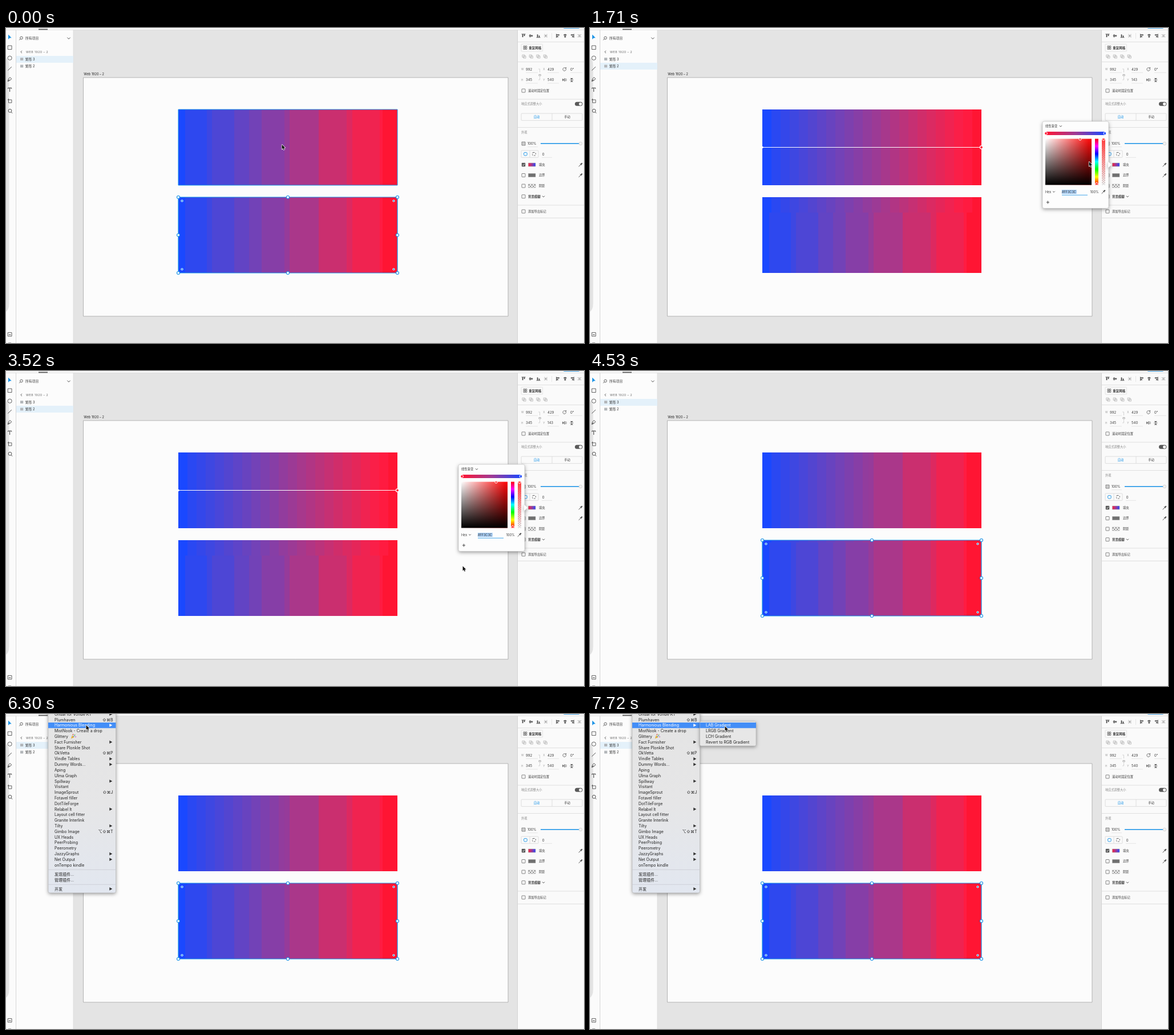
An HTML page with a canvas that plays this animation: 1013 by 553 pixels, repeating every 8 s.

```html
<!DOCTYPE html>
<html lang="zh">
<head>
<meta charset="utf-8">
<title>Colour ramp editor</title>
<style>
html, body { margin: 0; width: 100%; height: 100%; background: #e4e4e4; }
canvas { position: fixed; left: 0; top: 0; }
</style>
</head>
<body>
<canvas id="stage" width="1013" height="553"></canvas>
<script>
const ctx = document.getElementById('stage').getContext('2d');
const LOOP = 8000, BLUE = '#1490e6', INK = '#3c3c3c';
const FONT = 'Inter, "Noto Sans CJK SC", "Noto Sans CJK", "DejaVu Sans", sans-serif';
const BOX = { x: 302, w: 384, h: 133, top: 143, bottom: 297 };

// Pointer positions: start time, x, y
const POINTER = [
  [0, 483, 204], [360, 690, 230], [690, 950, 260], [870, 926, 246], [1140, 920, 240],
  [1710, 874, 234], [1890, 872, 240], [2070, 868, 246], [2250, 867, 260], [2440, 867, 282],
  [2620, 870, 309], [2800, 886, 332], [2980, 915, 343], [3160, 930, 343], [3340, 800, 342],
  [3550, 560, 325], [3730, 474, 289], [3910, 350, 200], [4130, 255, 130], [4350, 144, 8],
  [4530, 140, -30], [5420, 134, 8], [5600, 135, 15], [5780, 136, 16], [5960, 137, 18],
  [6130, 139, 19], [6300, 140, 19], [6480, 142, 20], [6660, 160, 20], [6840, 185, 21],
  [7000, 205, 22], [7180, 225, 26], [7360, 234, 27], [7540, 236, 23], [7720, 236, 21]
];

// Label, then "▸" for a submenu or a shortcut
const MENU = [
  ['Ondal for Vonde KT', '▸'], ['Plumhaven', '⇧⌘B'], ['Harmonious Blending', '▸'],
  ['MistNook - Create a drop'], ['Glittery'], ['Fact Furnisher', '▸'], ['Share Plonkle Shot'],
  ['OkVetta', '⇧⌘P'], ['Vindle Tables', '▸'], ['Dummy Words...', '▸'], ['Aping'],
  ['Ulma Graph'], ['Spillway', '▸'], ['Visitant'], ['ImageSprout', '⇧⌘J'],
  ['Fotavel filler'], ['DotTileForge'], ['Relabel It', '▸'], ['Layout cell fitter'],
  ['Granite Interlink'], ['Tilty', '▸'], ['Gimbo Image', '⌥⇧⌘T'], ['UX Heads'],
  ['PeerProbing'], ['Peerometry'], ['JazzyGraphs', '▸'], ['Net Output', '▸'], ['onTempo kindle']
];
const SUBMENU = ['LAB Gradient', 'LRGB Gradient', 'LCH Gradient', 'Revert to RGB Gradient'];

function fill(color, x, y, w, h, r = 0) {
  ctx.fillStyle = color;
  ctx.beginPath();
  ctx.roundRect(x, y, w, h, r);
  ctx.fill();
}
function frame(color, x, y, w, h, r = 0, width = 0.8) {
  ctx.strokeStyle = color;
  ctx.lineWidth = width;
  ctx.beginPath();
  ctx.roundRect(x, y, w, h, r);
  ctx.stroke();
}
function trace(points) {
  ctx.beginPath();
  for (let i = 0; i < points.length; i += 2) ctx.lineTo(points[i], points[i + 1]);
}
function line(color, width, ...points) {
  ctx.strokeStyle = color;
  ctx.lineWidth = width;
  trace(points);
  ctx.stroke();
}
function shape(color, ...points) {
  ctx.fillStyle = color;
  trace(points);
  ctx.fill();
}
function circle(x, y, r, color, stroke, width = 1) {
  ctx.beginPath();
  ctx.arc(x, y, r, 0, 7);
  if (color) { ctx.fillStyle = color; ctx.fill(); }
  if (stroke) { ctx.strokeStyle = stroke; ctx.lineWidth = width; ctx.stroke(); }
}
function text(str, x, y, { size = 5.5, color = INK, weight = 400, align = 'left', spacing = 0 } = {}) {
  ctx.font = `${weight} ${size}px ${FONT}`;
  ctx.letterSpacing = spacing + 'px';
  ctx.textAlign = align;
  ctx.fillStyle = color;
  ctx.fillText(str, x, y + size * 0.37);
}
function blend(x0, y0, x1, y1, ...colors) {
  const g = ctx.createLinearGradient(x0, y0, x1, y1);
  colors.forEach((c, i) => g.addColorStop(i / (colors.length - 1), c));
  return g;
}
function checker(x, y, w, h, s, color = '#999') {
  fill('#fff', x, y, w, h);
  for (let j = 0; j * s < h; j++)
    for (let i = j % 2; i * s < w; i += 2)
      fill(color, x + i * s, y + j * s, Math.min(s, w - i * s), Math.min(s, h - j * s));
}
function chevron(x, y, color = INK, s = 2.2) {
  line(color, 0.9, x - s, y - s / 2, x, y + s / 2, x + s, y - s / 2);
}
function shadowed(blur, alpha, draw) {
  ctx.save();
  ctx.shadowColor = `rgba(0,0,0,${alpha})`;
  ctx.shadowBlur = blur;
  ctx.shadowOffsetY = 2;
  draw();
  ctx.restore();
}
function clipped(x, y, w, h, draw) {
  ctx.save();
  ctx.beginPath();
  ctx.rect(x, y, w, h);
  ctx.clip();
  draw();
  ctx.restore();
}

// Banded blue-to-red ramp
const COARSE = [302, 314, 352, 361, 400, 426, 448, 488, 497, 548, 597, 607, 655, 660, 686];
const FINE = Array.from({ length: 25 }, (_, i) => BOX.x + i * 16);
function ramp(y, edges) {
  for (let i = 0; i < edges.length - 1; i++) {
    const first = i === 0, last = i === edges.length - 2;
    const u = first ? 0 : last ? 1 : ((edges[i] + edges[i + 1]) / 2 - BOX.x) / BOX.w;
    const rgb = [Math.min(255, 26 + 250 * u), 72 - 51 * u * u, 255 - 204 * u].map(Math.round);
    fill(`rgb(${rgb})`, edges[i], y, edges[i + 1] - edges[i], BOX.h);
  }
}
function ramps(edges) {
  ramp(BOX.top, edges);
  ramp(BOX.bottom, edges);
}
function selection(y) {
  const { x, w, h } = BOX;
  frame(BLUE, x, y, w, h, 0, 1.2);
  for (const i of [0, 1, 2]) for (const j of [0, 1, 2])
    if (i !== 1 || j !== 1) circle(x + i * w / 2, y + j * h / 2, 2.5, '#fff', BLUE, 1.1);
  for (const px of [x + 6.5, x + w - 6.5])
    for (const py of [y + 6.5, y + h - 6.5]) {
      circle(px, py, 2.1, '#fff');
      circle(px, py, 1.2, BLUE);
    }
}

function toolbar() {
  fill('#fbfbfb', 0, 0, 18, 553);
  ctx.fillStyle = '#e3e3e3';
  ctx.beginPath();
  ctx.moveTo(0, 52);
  ctx.quadraticCurveTo(5.5, 56, 5.5, 66);
  ctx.lineTo(5.5, 484);
  ctx.quadraticCurveTo(5.5, 494, 0, 498);
  ctx.fill();
  line('#d6d6d6', 1, 17.5, 3, 17.5, 553);
  shape(BLUE, 4, 11.5, 4, 20, 6.3, 17.6, 9.6, 17.2);
  frame(INK, 3.2, 31, 6.8, 6.6);
  circle(6.6, 52.7, 3.6, null, INK, 0.8);
  line(INK, 0.9, 3.3, 74.5, 9.8, 68);
  line(INK, 0.9, 3.3, 93.5, 4.4, 89.3, 7, 86.5, 9.7, 89.2, 7, 92, 3.3, 93.5, 6.3, 90.3);
  line(INK, 1, 3.5, 106.7, 3.5, 105.2, 9.7, 105.2, 9.7, 106.7);
  line(INK, 1, 6.6, 105.2, 6.6, 112);
  frame(INK, 4.5, 126, 5.4, 5.2);
  line(INK, 0.8, 2.7, 126, 4.5, 126, 4.5, 124);
  circle(7, 145.3, 2.9, null, INK, 0.9);
  line(INK, 1, 9, 147.5, 11, 149.6);
  frame(INK, 3.2, 534.7, 6.8, 6.4);
  line(INK, 0.9, 4.8, 538.5, 8.4, 538.5);
  line('#aaa', 1, 4, 552.5, 9, 552.5);
}

function layers(selected) {
  fill('#fcfcfc', 18, 0, 100, 553);
  line('#d8d8d8', 0.7, 118, 3, 118, 553);
  circle(27, 17.4, 2.3, null, INK, 0.8);
  line(INK, 0.9, 25.2, 19.2, 23.2, 21.2);
  text('所有项目', 34, 18, { size: 5.8 });
  chevron(110, 18, INK, 2.6);
  line(INK, 0.8, 28, 39.8, 25.8, 42, 28, 44.2);
  text('WEB 1920 – 2', 35, 42, { size: 5.1, color: '#777', weight: 500, spacing: 0.5 });
  fill('#e4f1fa', 18, selected === 3 ? 49 : 61, 100, 12);
  [['矩形 3', 54.6], ['矩形 2', 67]].forEach(([name, y]) => {
    fill('#b8bcc0', 25, y - 2.5, 5.2, 5);
    line('#999', 0.5, 25, y, 30.2, y);
    text(name, 34, y, { size: 5.7, color: '#222' });
  });
}

function checkbox(y, on) {
  if (on) fill('#555', 903.8, y - 3.2, 6.4, 6.4, 0.8);
  else frame('#666', 904, y - 3, 6, 6, 0.6);
  if (on) line('#fff', 0.9, 905.3, y, 906.6, y + 1.4, 908.8, y - 1.4);
}
function eyedropper(x, y) {
  line('#555', 1, x - 3.3, y + 3.3, x + 1, y - 1);
  line('#444', 2, x + 0.6, y - 0.6, x + 2.8, y - 2.8);
  line('#444', 0.9, x - 1, y - 1.8, x + 1.8, y + 1);
}
function alignIcon(x, vertical, edge, color = '#444') {
  ctx.save();
  ctx.translate(x, 13.7);
  if (vertical) ctx.rotate(-Math.PI / 2);
  line(color, 0.8, edge * 3, -3.5, edge * 3, 3.5);
  fill(color, edge < 0 ? -2.6 : edge > 0 ? -2.4 : -2.5, -2.3, 5, 1.7);
  fill(color, edge < 0 ? -2.6 : edge > 0 ? -0.4 : -1.5, 0.7, 3, 1.7);
  ctx.restore();
}

function inspector(selected) {
  fill('#fafafa', 896, 0, 117, 553);
  line('#d4d4d4', 1, 896.5, 3, 896.5, 553);
  for (const y of [24.5, 59.5, 125, 174.5, 311, 333.5]) line('#d9d9d9', 0.8, 897, y, 1013, y);

  [1, 0, -1].forEach((edge, i) => alignIcon(907 + i * 13, true, edge));
  [-1, 0, 1].forEach((edge, i) => alignIcon(967.5 + i * 12.4, false, edge));
  for (const dx of [-2, 2]) line('#aaa', 0.7, 946 + dx, 10.5, 946 + dx, 17);
  for (const dy of [-2, 2]) line('#aaa', 0.7, 1001.5, 13.7 + dy, 1008.5, 13.7 + dy);
  fill('#aaa', 945, 12, 2, 3.5);
  fill('#aaa', 1003.3, 12.7, 3.5, 2);
  line('#ddd', 0.7, 956.5, 9, 956.5, 19);

  frame('#ddd', 903, 28.3, 37.5, 12.8, 1);
  for (const x of [907, 910.4]) for (const y of [31.5, 34.9]) frame('#444', x, y, 2.4, 2.6, 0, 0.7);
  text('重复网格', 916.2, 34.8, { weight: 600 });
  for (const x of [904.8, 917.2, 929.8, 942.2]) {
    frame('#aaa', x, 47.2, 4.2, 4, 0, 0.7);
    frame('#aaa', x + 2, 49, 4.2, 4, 0, 0.7);
  }

  const rows = [['W', '992', 'X', '429', 72.3], ['H', '345', 'Y', selected === 3 ? '540' : '143', 91]];
  for (const [a, av, b, bv, y] of rows) {
    text(a, 903, y, { size: 4.6, color: '#999' });
    text(av, 911, y, { size: 6 });
    text(b, 941.3, y, { size: 4.6, color: '#999' });
    text(bv, 949, y, { size: 6 });
    line('#ddd', 0.7, 911, y + 6, 932, y + 6);
    line('#ddd', 0.7, 949, y + 6, 969, y + 6);
  }
  text('0°', 989, 72.3, { size: 6 });
  line('#ddd', 0.7, 989, 78.3, 1010, 78.3);
  line('#bbb', 0.6, 933, 72, 935.5, 72, 935.5, 78);
  line('#bbb', 0.6, 933, 91, 935.5, 91, 935.5, 86);
  frame('#777', 934, 81.5, 3.2, 2.6, 0.3, 0.6);
  ctx.beginPath();
  ctx.arc(978.7, 72.5, 2.8, -0.4, 5.2);
  ctx.strokeStyle = '#555';
  ctx.lineWidth = 0.8;
  ctx.stroke();
  shape('#555', 979.5, 71, 982, 71, 982, 68.6);
  shape('#555', 975.3, 88.5, 975.3, 93.5, 978, 91);
  line('#555', 0.8, 978.8, 88, 978.8, 94);
  frame('#555', 979.7, 89.4, 2.4, 3.2, 0, 0.6);
  shape('#555', 988.8, 88, 994, 88, 991.4, 90.5);
  shape('#555', 988.8, 94.6, 994, 94.6, 991.4, 92);
  line('#555', 0.8, 988.3, 91.2, 994.5, 91.2);

  checkbox(110);
  text('滚动时固定位置', 915, 110, { size: 5.3, weight: 500 });
  text('响应式调整大小', 903, 133.5, { size: 5.2, color: '#888' });
  fill('#5a5a5a', 997, 129.8, 13.5, 7, 3.5);
  circle(1006.8, 133.3, 2.6, '#fff');
  frame('#d6d6d6', 903, 150, 107, 12.3, 1);
  line('#d6d6d6', 0.8, 957, 150, 957, 162);
  text('自动', 930, 156, { size: 5.3, color: BLUE, weight: 500, align: 'center' });
  text('手动', 983.5, 156, { size: 5.3, weight: 500, align: 'center' });

  text('外观', 903, 183.5, { size: 5.2, color: '#888' });
  checker(904, 200, 6, 6, 1.5);
  frame('#666', 904, 200, 6, 6, 0, 0.7);
  text('100%', 914, 202.7, { size: 5.8 });
  line('#ddd', 0.7, 914, 208.7, 932, 208.7);
  line(BLUE, 1.6, 937, 202.8, 1006, 202.8);
  circle(1007, 202.8, 2.8, '#f2f2f2', '#ccc', 0.7);
  frame('#d6d6d6', 903, 215, 30, 12.3, 1);
  line('#d6d6d6', 0.8, 918, 215, 918, 227);
  frame(BLUE, 907.6, 218.5, 5.6, 5.4, 1.5, 0.9);
  ctx.setLineDash([2.6, 1.7]);
  frame('#555', 922.7, 218.5, 5.6, 5.4, 1.3, 0.9);
  ctx.setLineDash([]);
  text('0', 939.8, 221.3, { size: 6 });
  line('#ddd', 0.7, 939, 227.3, 957, 227.3);

  [['填充', 240], ['边界', 258.5], ['阴影', 277.2]].forEach(([label, y], i) => {
    checkbox(y, i === 0);
    if (i === 2) checker(915.5, y - 3, 12.5, 6, 2.5);
    else fill(i ? '#707070' : blend(915, 0, 928, 0, '#ff2038', '#a03a94', '#2848ff'), 915.5, y - 3, 12.5, 6);
    frame('#999', 915.5, y - 3, 12.5, 6, 0, 0.5);
    text(label, 934, y, { size: 5.3, weight: 500 });
    if (i < 2) eyedropper(1007, y);
  });
  checkbox(295.8);
  text('背景模糊', 915, 295.8, { size: 5.4, weight: 600 });
  chevron(942, 295.8, INK, 2);
  checkbox(322);
  text('添加导出标记', 915, 322, { size: 5.3, weight: 500 });
}

function colorPopup() {
  shadowed(6, 0.4, () => {
    fill('#fdfdfd', 793, 164, 116, 152.5, 3);
    shape('#fdfdfd', 908, 234, 914, 240, 908, 246);
  });
  frame('#c4c4c4', 793, 164, 116, 152.5, 3, 0.6);
  shape('#fdfdfd', 908, 235, 913.5, 240, 908, 245);
  text('线性渐变', 798, 172.3, { size: 5.3 });
  chevron(824.8, 172.3, INK, 2);
  fill(blend(799, 0, 903, 0, '#ff1533', '#a03a94', '#1a48ff'), 798.5, 182, 104.5, 6);
  clipped(797, 180, 107, 10, () => {
    circle(799, 185, 2.4, '#ff1533', '#fff', 1);
    circle(902.5, 185, 2.4, '#1a48ff', '#fff', 1);
  });
  fill(blend(798, 0, 879, 0, '#fff', '#f00'), 798, 194.5, 81, 81);
  fill(blend(0, 194, 0, 275, 'rgba(0,0,0,0)', '#000'), 798, 194.5, 81, 81);
  fill(blend(0, 194, 0, 275, '#f00', '#f0f', '#00f', '#0ff', '#0f0', '#ff0', '#f00'), 885, 194.5, 6, 81);
  checker(897, 194.5, 6, 81, 2, '#ccc');
  fill(blend(0, 194, 0, 275, '#ff3c3c', 'rgba(255,60,60,0)'), 897, 194.5, 6, 81);
  clipped(797, 194, 108, 82, () => {
    for (const [x, y] of [[859, 194.7], [888, 273.8], [900, 195]]) circle(x, y, 2.3, '#f33', '#fff', 1);
  });
  text('Hex', 798, 287.5, { size: 5.5 });
  chevron(813, 287.5, INK, 1.8);
  fill('#a6cdf5', 826.8, 284, 26, 7.2);
  text('#FF3C3C', 827, 287.5, { size: 5.5 });
  line(BLUE, 0.8, 827, 293.3, 872, 293.3);
  text('100%', 876.5, 287.5, { size: 5.7 });
  eyedropper(900, 287.5);
  line(INK, 0.9, 799.8, 306, 805, 306);
  line(INK, 0.9, 802.4, 303.4, 802.4, 308.6);
}

function arrow(y, color) {
  shape(color, 181.3, y - 2.7, 181.3, y + 2.7, 186.3, y);
}
function menuText(label, x, y, active, align) {
  text(label, x, y, { size: 7, color: active ? '#fff' : '#222', align });
}
function menu(active) {
  const paper = blend(0, 0, 0, 314, '#e4e4e4', '#e6e6e7', '#e2e7f0');
  shadowed(6, 0.4, () => fill(paper, 74, -10, 118.5, 324, 3));
  frame('#b8b8b8', 74, -10, 118.5, 324, 3, 0.6);
  MENU.forEach(([label, extra], i) => {
    const y = 0.2 + i * 9.81, on = i === active;
    if (on) fill('#438ef7', 74, y - 4.9, 118.5, 9.8);
    menuText(label, 85, y, on);
    if (extra === '▸') arrow(y, on ? '#fff' : '#333');
    else if (extra) menuText(extra, 187.5, y, on, 'right');
  });
  shape('#e0b040', 113.8, 43.2, 116, 37.3, 119.6, 41);
  ['#d8433c', '#4a90d9', '#58a848', '#c05ac0'].forEach((c, i) =>
    circle(117.5 + i * 1.5, 36 + (i * 3) % 5, 0.9, c));
  for (const y of [273.3, 299.3]) line('#c9ccd3', 0.8, 74, y, 192.5, y);
  menuText('发现插件...', 85, 281.2);
  menuText('管理插件...', 85, 291);
  menuText('开发', 85, 307);
  arrow(307, '#333');
}
function submenu(active) {
  shadowed(6, 0.4, () => fill('#e7e7e7', 192.5, 13, 98.5, 43, 2.5));
  frame('#b8b8b8', 192.5, 13, 98.5, 43, 2.5, 0.6);
  SUBMENU.forEach((label, i) => {
    const y = 19.9 + i * 9.81;
    if (i === active) fill('#438ef7', 192.5, y - 4.9, 98.5, 9.8);
    menuText(label, 203, y, i === active);
  });
}

function pointer(t) {
  const [, x, y] = POINTER.findLast(p => p[0] <= t);
  ctx.save();
  ctx.translate(x, y);
  ctx.lineJoin = 'round';
  const outline = [0.5, 0.5, 0.5, 8.8, 2.4, 7.1, 3.6, 9.9, 5, 9.3, 3.8, 6.5, 6.4, 6.4, 0.5, 0.5];
  line('#fff', 1.4, ...outline);
  shape('#111', ...outline);
  ctx.restore();
}

function draw(t) {
  const selected = t < 690 || t >= 3550 ? 3 : 2;
  const popup = t >= 1710 && t < 3550;

  fill('#e4e4e4', 0, 0, 1013, 553);
  fill('#fcfcfc', 135.5, 87, 744.5, 419);
  frame('#a4a4a4', 135.5, 87, 744.5, 419, 0, 0.8);
  text('Web 1920 – 2', 136.3, 80.7, { size: 5.6, color: '#222' });

  ramps(COARSE);
  const fineArea = popup ? [302, 143, 384, 181] : t >= 3910 ? [302, 143, 186, 158] : null;
  if (fineArea) clipped(...fineArea, () => ramps(FINE));
  if (t < 690) frame(BLUE, BOX.x, BOX.top, BOX.w, BOX.h, 0, 1);
  if (popup) {
    line('#fff', 1, 302, 209.5, 686, 209.5);
    circle(302, 209.5, 1.8, '#fff');
    circle(686, 209.5, 2.6, '#ff1533', '#fff', 1.3);
  } else selection(selected === 3 ? BOX.bottom : BOX.top);

  toolbar();
  layers(selected);
  inspector(selected);
  fill('#fafafa', 0, 0, 1013, 3);
  line('#d8d8d8', 0.8, 0, 3.3, 1013, 3.3);
  fill('#555', 57, 1.6, 16, 1.7);
  fill(BLUE, 976, -5, 30, 5.7, 3);

  if (popup) colorPopup();
  if (t >= 5070) menu(t < 5420 ? -1 : t < 5780 ? 1 : 2);
  if (t >= 6480) submenu(t < 7000 ? -1 : t >= 7180 && t < 7540 ? 1 : 0);
  pointer(t);
}

const start = performance.now();
function tick() {
  draw((performance.now() - start) % LOOP);
  requestAnimationFrame(tick);
}
tick();
</script>
</body>
</html>
```
